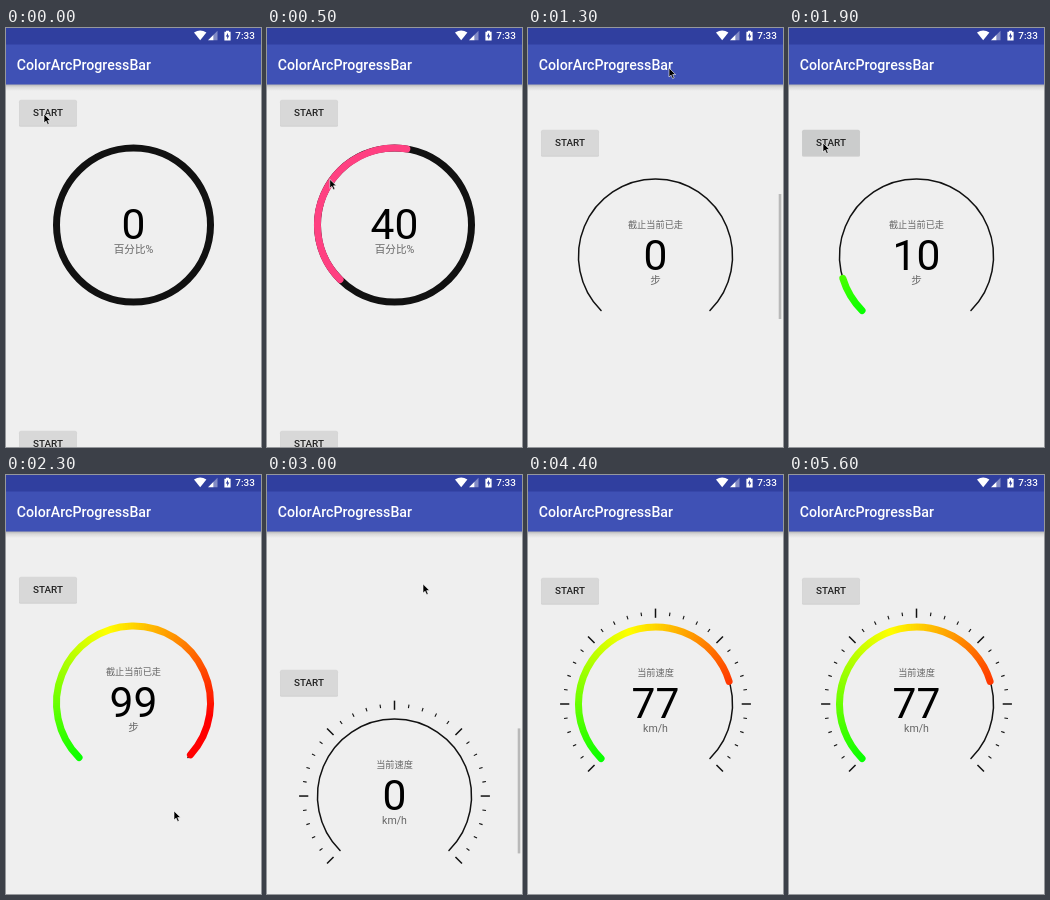
An HTML page for the animation above (5.7 s loop, 255x419 px).

```html
<!DOCTYPE html>
<html lang="en">
<head>
<meta charset="utf-8">
<title>ColorArcProgressBar</title>
<style>
html, body { margin: 0; width: 100%; height: 100%; overflow: hidden; background: #efefef; }
svg { display: block; width: 100%; height: 100%; }
text { font-family: Roboto, "Noto Sans CJK SC", "Noto Sans CJK", sans-serif; }
.mid { text-anchor: middle; }
.med { font-weight: 500; }
.big { font-size: 42.5px; }
.hint { font-size: 10.6px; fill: #676767; }
.head { font-size: 9.2px; fill: #676767; }
</style>
</head>
<body>
<svg id="stage" viewBox="0 0 255 419">
  <defs>
    <linearGradient id="shade" x2="0" y2="1">
      <stop offset="0" stop-color="#000" stop-opacity=".27"/>
      <stop offset=".45" stop-color="#000" stop-opacity=".09"/>
      <stop offset="1" stop-color="#000" stop-opacity="0"/>
    </linearGradient>
  </defs>
  <rect width="255" height="419" fill="#efefef"/>
  <g id="list"></g>
  <rect id="thumb" x="250.7" width="2.6" height="125" fill="#b9b9b9"/>
  <rect y="56" width="255" height="7" fill="url(#shade)"/>
  <rect width="255" height="56.5" fill="#3f51b5"/>
  <rect width="255" height="16.5" fill="#303f9f"/>
  <text class="med" x="10.8" y="42" font-size="14.17" fill="#fff">ColorArcProgressBar</text>
  <g fill="#fff">
    <path d="M188 4.6Q194.2 .6 200.4 4.6L194.2 12.2Z"/>
    <path d="M202 12.2L207.5 6.7V12.2Z"/>
    <path d="M207.5 6.7L211.5 2.7V12.2H207.5Z" opacity=".4"/>
    <path d="M218.4 3.8H220V2.8H223V3.8H224.6V12.4H218.4Z"/>
    <path d="M222 4.8L219.8 8.6H221.2V11.4L223.3 7.6H222Z" fill="#303f9f"/>
    <text class="med" x="229.3" y="11.4" font-size="9.9">7:33</text>
  </g>
  <path id="cursor" d="M0 0V9L2.1 7.1L3.6 10.5L5.2 9.8L3.7 6.5H6.6Z" fill="#000" stroke="#fff" stroke-width=".6"/>
</svg>
<script>
const LOOP = 5700, STEP = 100, RUN = 550;
const CX = 127.5, R = 77, START = 135;
const $ = id => document.getElementById(id);

function add(parent, tag, attrs, text) {
  const el = document.createElementNS('http://www.w3.org/2000/svg', tag);
  for (const k in attrs) el.setAttribute(k, attrs[k]);
  if (text) el.textContent = text;
  return parent.appendChild(el);
}

function polar(cy, r, deg) {
  const a = deg * Math.PI / 180;
  return (CX + r * Math.cos(a)).toFixed(2) + ' ' + (cy + r * Math.sin(a)).toFixed(2);
}

// Split in two halves so that full circles work as well.
function arc(cy, from, sweep) {
  const to = deg => `A${R} ${R} 0 0 1 ${polar(cy, R, from + deg)}`;
  return `M${polar(cy, R, from)}${to(sweep / 2)}${to(sweep)}`;
}

// Green to yellow to red, each over 120 degrees.
function sweepColor(deg) {
  const p = deg / 120;
  const r = Math.round(255 * Math.min(1, p));
  const g = Math.round(255 * Math.max(0, Math.min(1, 2 - p)));
  return `rgb(${r},${g},0)`;
}

function drawTicks(g, cy) {
  for (let i = 0; i < 40; i++) {
    if (i > 15 && i < 25) continue;
    const long = i % 5 === 0, deg = i * 9 - 90;
    const inner = long ? 86.2 : 89, len = long ? 9.2 : 3.6;
    add(g, 'path', {
      d: `M${polar(cy, inner, deg)}L${polar(cy, inner + len, deg)}`,
      stroke: '#111', 'stroke-width': long ? 1.5 : 1.1
    });
  }
}

function makeGauge(o, n) {
  const g = add($('list'), 'g', {}), cy = o.y + o.drop;
  add(g, 'rect', { x: 13, y: o.y + .6, width: 58, height: 26.2, rx: 1.6, fill: '#000', opacity: .13 });
  const button = add(g, 'rect', { x: 13.2, y: o.y - .3, width: 57.6, height: 26, rx: 1.5 });
  add(g, 'text', { class: 'mid med', x: 42, y: o.y + 16.4, 'font-size': 9.9, fill: '#212121' }, 'START');

  if (o.ticks) drawTicks(g, cy);
  add(g, 'path', {
    d: arc(cy, START, o.sweep), fill: 'none', stroke: '#111',
    'stroke-width': o.track, 'stroke-linecap': 'round'
  });

  const line = { fill: 'none', 'stroke-width': 7, 'stroke-linecap': 'round' };
  let bar;
  if (o.color) {
    bar = add(g, 'path', { ...line, stroke: o.color });
  } else {
    const mask = add(g, 'mask', {
      id: 'bar' + n, maskUnits: 'userSpaceOnUse', x: 0, y: cy - 100, width: 255, height: 200
    });
    bar = add(mask, 'path', { ...line, stroke: '#fff' });
    const ring = add(g, 'g', { mask: `url(#bar${n})`, fill: 'none', 'stroke-width': 10 });
    for (let d = 0; d < 280; d += 2)
      add(ring, 'path', { d: arc(cy, 130 + d, 2.6), stroke: sweepColor(d + 1) });
  }

  if (o.head) add(g, 'text', { class: 'mid head', x: CX, y: cy - 28.4 }, o.head);
  const value = add(g, 'text', { class: 'mid big', x: CX, y: cy + 14.2 });
  add(g, 'text', { class: 'mid hint', x: CX, y: cy + 28.3 }, o.hint);

  return t => {
    const p = Math.max(0, Math.min(1, (t - o.at) / RUN));
    const now = o.max * (1 - Math.cos(Math.PI * p)) / 2;
    value.textContent = Math.round(now);
    bar.setAttribute('d', now > 0 ? arc(cy, START, o.sweep * now / 100) : '');
    const pressed = t >= o.at - 50 && t < o.at + 200;
    button.setAttribute('fill', pressed ? '#cbcccc' : '#d8d8d8');
  };
}

const gauges = [
  { y: 72, drop: 125, sweep: 360, track: 7, color: '#ff4081', hint: '百分比%', max: 100, at: 260 },
  { y: 403, drop: 126, sweep: 270, track: 1.5, head: '截止当前已走', hint: '步', max: 100, at: 1785 },
  { y: 759, drop: 126, sweep: 270, track: 1.5, head: '当前速度', hint: 'km/h', max: 77, at: 3785, ticks: true }
].map(makeGauge);

// Linear track through [time, ...values] keys.
function track(keys, t) {
  let i = 1;
  while (i < keys.length - 1 && keys[i][0] < t) i++;
  const a = keys[i - 1], b = keys[i];
  const p = Math.max(0, Math.min(1, (t - a[0]) / (b[0] - a[0])));
  return a.slice(1).map((v, k) => v + (b[k + 1] - v) * p);
}

const smooth = (t, a, b) => {
  const p = Math.max(0, Math.min(1, (t - a) / (b - a)));
  return p * p * (3 - 2 * p);
};

const pointer = [
  [0, 38, 86], [100, 34, 87], [400, 34, 87], [800, 149, 344], [900, 149, 349],
  [1300, 141, 40], [1400, 138, 42], [1700, 32, 114], [1900, 34, 115],
  [2300, 168, 336], [2600, 168, 378], [3200, 150, 15], [3300, 130, 25],
  [3500, 28, 129], [4100, 28, 128]
];
const thumbAlpha = [
  [900, 0], [1000, 1], [1400, 1], [1800, 0], [2600, 0], [2700, 1], [3300, 1], [3650, 0]
];

function draw(t) {
  const first = smooth(t, 900, 1300), second = smooth(t, 2600, 3200);
  const scroll = 301 * first + 355 * second;
  $('list').setAttribute('transform', `translate(0 ${-scroll})`);
  $('thumb').setAttribute('y', 66 + scroll * .3323);
  $('thumb').setAttribute('opacity', track(thumbAlpha, t)[0]);
  gauges.forEach(update => update(t));

  let [x, y] = track(pointer, t);
  if (t >= 900 && t <= 1300) y = 349 - 309 * first;
  if (t >= 2600 && t <= 3200) y = 378 - 363 * second;
  $('cursor').setAttribute('transform', `translate(${x} ${y})`);
  $('cursor').setAttribute('visibility', t < 4200 ? 'visible' : 'hidden');
}

const begin = performance.now();
function frame() {
  const t = (performance.now() - begin) % LOOP;
  draw(Math.floor(t / STEP) * STEP);
  requestAnimationFrame(frame);
}
frame();
</script>
</body>
</html>
```
